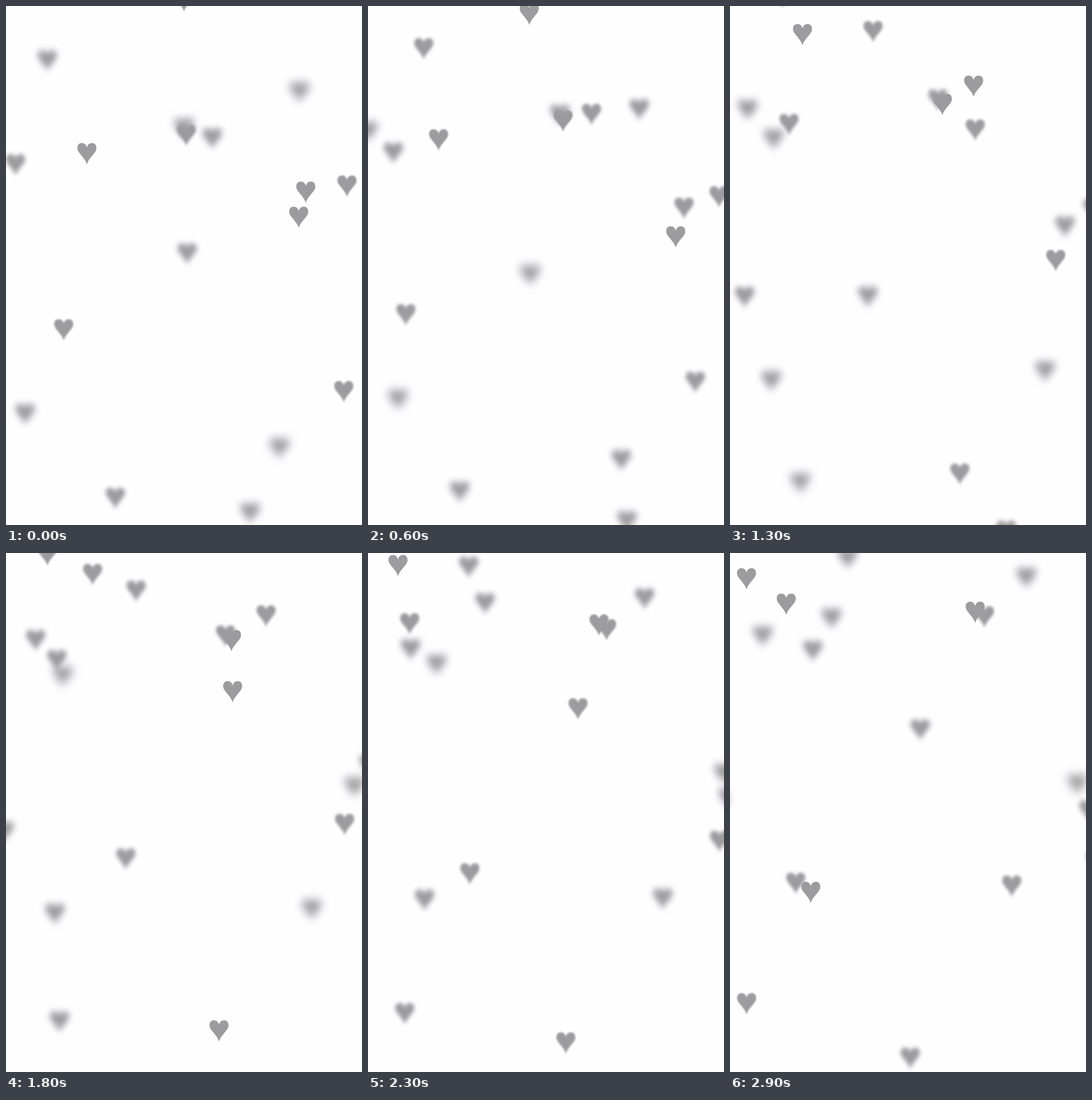
An HTML page for the animation above (3 s loop, 600 by 873 pixels).

```html
<!DOCTYPE html>
<html lang="en">
<head>
<meta charset="utf-8">
<title>Drifting hearts</title>
<style>
  html, body { margin: 0; width: 100%; height: 100%; overflow: hidden; background: #fefdff; }
  #stage { position: relative; width: 600px; height: 873px; overflow: hidden; }
  svg { position: absolute; left: -16px; top: -18px; width: 32px; height: 36px; overflow: visible; fill: #9c9b9d; }
</style>
</head>
<body>
<div id="stage"></div>
<script>
const LOOP = 3000, STEP = 100;
const MAX_BLUR = 8;
const LOW = -49, RIGHT = 614;          // turning points just outside the stage
const SHIFT_X = 0.9, SHIFT_Y = 1.2;    // softer hearts sit further right and down

const SHAPE = 'M0 18C-2 11-6 7-10 2C-14-3-16-5-16-10C-16-15-13-18-8.5-18C-4-18-1-15 0-10.5' +
  'C1-15 4-18 8.5-18C13-18 16-15 16-10C16-5 14-3 10 2C6 7 2 11 0 18Z';

// Three groups by focus speed; each heart: start x, y, velocity x, y, focus phase
const groups = [
  { rate: 1.5, hearts: [
    [493, 355, 42, 55, 15.6],
    [302, 215, 43, -38, 14],
    [135, -31, -37, -38, 11.8]
  ] },
  { rate: 2.5, hearts: [
    [136, 248, -30, -40, 15.6],
    [299, -10, -46, 39, 14.9],
    [574, 302, 26, 27, 0.8],
    [96, 543, -58, -45, 1.4],
    [27, 680, 28, -44, 5.9],
    [405, 845, 44, 26, 8.9],
    [294, 198, 41, -34, 9.1],
    [13, 263, 42, -36, 3.5]
  ] },
  { rate: 4, hearts: [
    [505, 313, 42, 40, 0.3],
    [301, 411, -57, 55, 4.9],
    [181, 824, -53, -23, 3.6],
    [568, 647, -33, -31, 1.5],
    [454, 735, -53, 38, 8.3],
    [65, 86, 44, -29, 10.8],
    [488, 136, -59, 54, 8.6],
    [343, 217, 52, -63, 10.8],
    [-33, 234, 44, -51, 4.6]
  ] }
];

function bounce(v, high) {
  if (v < LOW) return 2 * LOW - v;
  return v > high ? 2 * high - v : v;
}

// Blur swings between sharp and soft at a steady rate
const blurAt = phase => MAX_BLUR - Math.abs(MAX_BLUR - phase % (2 * MAX_BLUR));

const stage = document.getElementById('stage');

function makeHeart([x, y, vx, vy, phase], rate) {
  stage.insertAdjacentHTML('beforeend', `<svg viewBox="-16 -18 32 36"><path d="${SHAPE}"/></svg>`);
  const style = stage.lastElementChild.style;
  return t => {
    const blur = blurAt(phase + rate * t);
    const px = bounce(x + vx * t, RIGHT) + SHIFT_X * blur;
    const py = bounce(y + vy * t, Infinity) + SHIFT_Y * blur;
    style.transform = `translate(${px.toFixed(2)}px, ${py.toFixed(2)}px)`;
    style.filter = `blur(${blur.toFixed(2)}px)`;
  };
}

const movers = groups.flatMap(({ rate, hearts }) => hearts.map(h => makeHeart(h, rate)));

const start = performance.now();
let shown = -1;
function tick() {
  const step = Math.floor((performance.now() - start) % LOOP / STEP);
  if (step !== shown) {
    shown = step;
    for (const move of movers) move(step * STEP / 1000);
  }
  requestAnimationFrame(tick);
}
tick();
</script>
</body>
</html>
```
